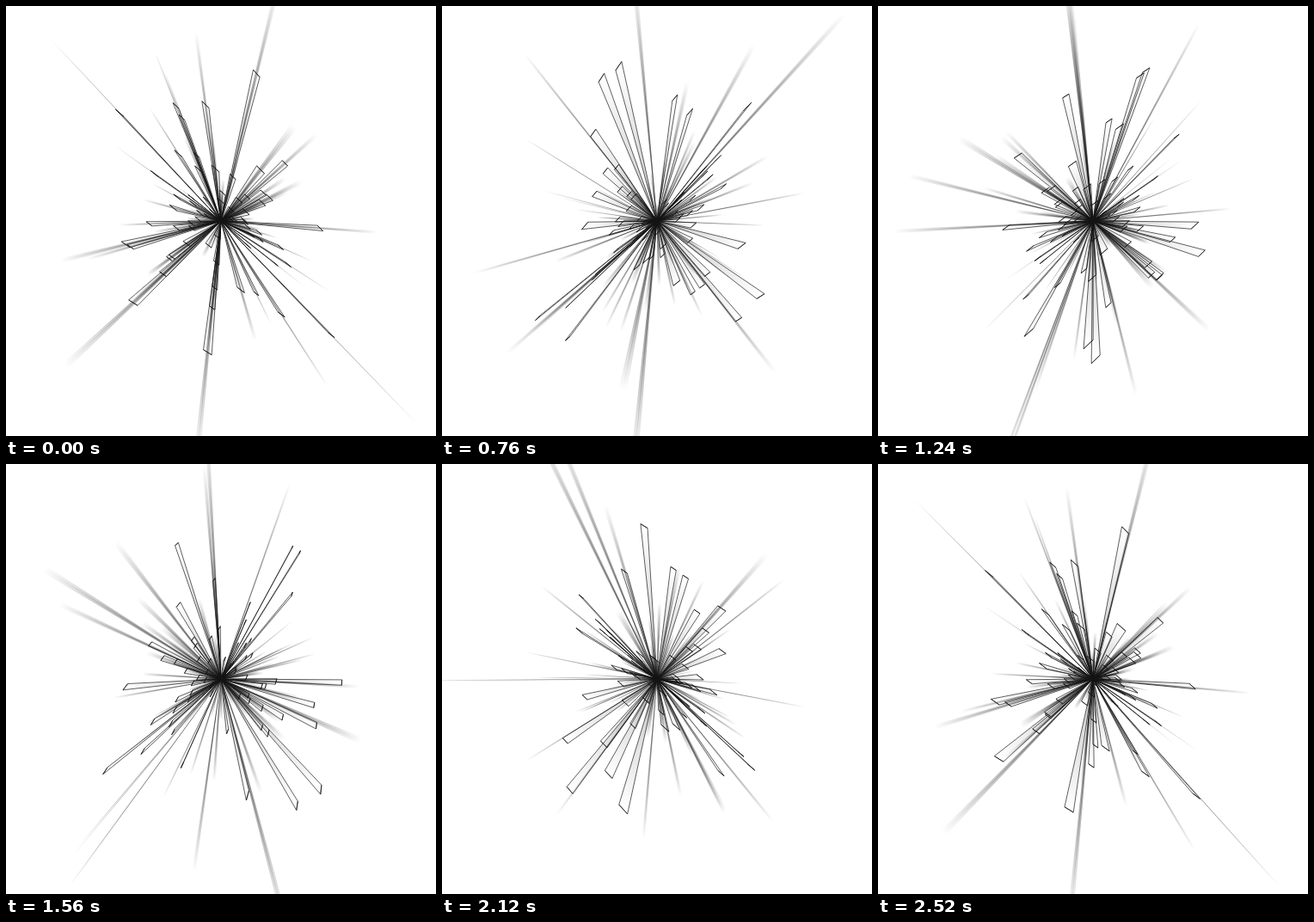
An HTML page with a canvas that plays this animation: 500x500 px, repeating every 2.56 s.

```html
<!DOCTYPE html>
<html lang="en">
<head>
<meta charset="utf-8">
<title>Rotating burst</title>
<style>
html, body { margin: 0; width: 100%; height: 100%; overflow: hidden; background: #fff; }
canvas { display: block; width: 500px; height: 500px; }
</style>
</head>
<body>
<canvas id="stage" width="500" height="500"></canvas>
<script>
const ctx = document.getElementById('stage').getContext('2d');
const LOOP = 2560, STEP = 40, SIZE = 500, CENTRE = SIZE / 2, CAMERA = 450;
const RAD = Math.PI / 180;
const REACH = 1.55; // length of a spike relative to its blade
const EDGE = [3.7, 3.1, -2.2]; // half of a blade's outer edge

let seed = 11;
function random() {
  seed = (seed * 16807) % 2147483647;
  return seed / 2147483647;
}

// Point at a distance from the vertical axis, an angle around it and a height
function polar(r, phi, height) {
  return [r * Math.sin(phi * RAD), height, r * Math.cos(phi * RAD)];
}

// The long rays that give the burst its outline
const rays = [
  [52, 47, -158], [118, -60, -109], [82, 226, -151], [90, 216, -140],
  [38, -26, -125], [112, 80, 8], [135, 50, 107], [119, -44, 77],
  [100, -7, 119], [100, 35, 89], [103, 187, 124], [110, 153, 103],
  [133, 184, 101], [138, 227, 4], [112, -60, 24], [124, 249, 33],
  [108, 221, 52], [86, 112, -72], [85, 203, -90], [109, 19, -46]
].map(ray => polar(...ray));

// Shorter rays spread evenly around the axis fill the core
const FILL = 46;
for (let i = 0; i < FILL; i++) {
  const r = 22 + 58 * i / FILL;
  rays.push(polar(r, 137.5 * i, 2 * r * (random() - 0.5)));
}

function turnY([x, y, z], a) {
  const c = Math.cos(a), s = Math.sin(a);
  return [x * c + z * s, y, z * c - x * s];
}

function turnX([x, y, z], a) {
  const c = Math.cos(a), s = Math.sin(a);
  return [x, y * c - z * s, y * s + z * c];
}

function project([x, y, z]) {
  const s = CAMERA / (CAMERA - z);
  return [CENTRE + x * s, CENTRE + y * s];
}

// Triangle from the centre to an outer edge, turned as a whole
function shape(ray, turn, angle, reach, width) {
  const corner = side => project(turn(
    ray.map((v, i) => v * reach + side * width * EDGE[i]), angle));
  return { tip: corner(0), p: corner(-1), q: corner(1) };
}

function path(...points) {
  ctx.beginPath();
  points.forEach(p => ctx.lineTo(...p));
}

function fade(s, alpha) {
  const g = ctx.createLinearGradient(CENTRE, CENTRE, ...s.tip);
  g.addColorStop(0, `rgba(20,20,20,${alpha})`);
  g.addColorStop(1, 'rgba(20,20,20,0)');
  return g;
}

const origin = [CENTRE, CENTRE];

function drawSpike(ray, angle) {
  const s = shape(ray, turnX, angle, REACH, 0.6);
  path(origin, s.p, s.q);
  ctx.fillStyle = fade(s, 0.7);
  ctx.fill();
  // keeps a spike seen edge-on visible
  path(origin, s.tip);
  ctx.strokeStyle = fade(s, 0.5);
  ctx.lineWidth = 1;
  ctx.stroke();
}

function drawBlade(ray, angle) {
  const s = shape(ray, turnY, angle, 1, 1);
  path(origin, s.p, s.q);
  ctx.closePath();
  ctx.fillStyle = fade(s, 0.25);
  ctx.fill();
  ctx.strokeStyle = 'rgba(20,20,20,0.8)';
  ctx.lineWidth = 0.85;
  ctx.stroke();
  path(s.p, s.q);
  ctx.lineWidth = 1;
  ctx.stroke();
}

// Blades turn about the vertical axis, spikes about the horizontal one
function draw(time) {
  const step = Math.floor((time % LOOP) / STEP);
  const angle = 2 * Math.PI * step * STEP / LOOP;
  ctx.fillStyle = '#fff';
  ctx.fillRect(0, 0, SIZE, SIZE);
  ctx.lineJoin = 'bevel';
  for (const ray of rays) drawSpike(ray, angle);
  for (const ray of rays) drawBlade(ray, angle);
}

let start = null;
function tick(now) {
  if (start === null) start = now;
  draw(Math.max(0, now - start));
  requestAnimationFrame(tick);
}
draw(0);
requestAnimationFrame(tick);
</script>
</body>
</html>
```
